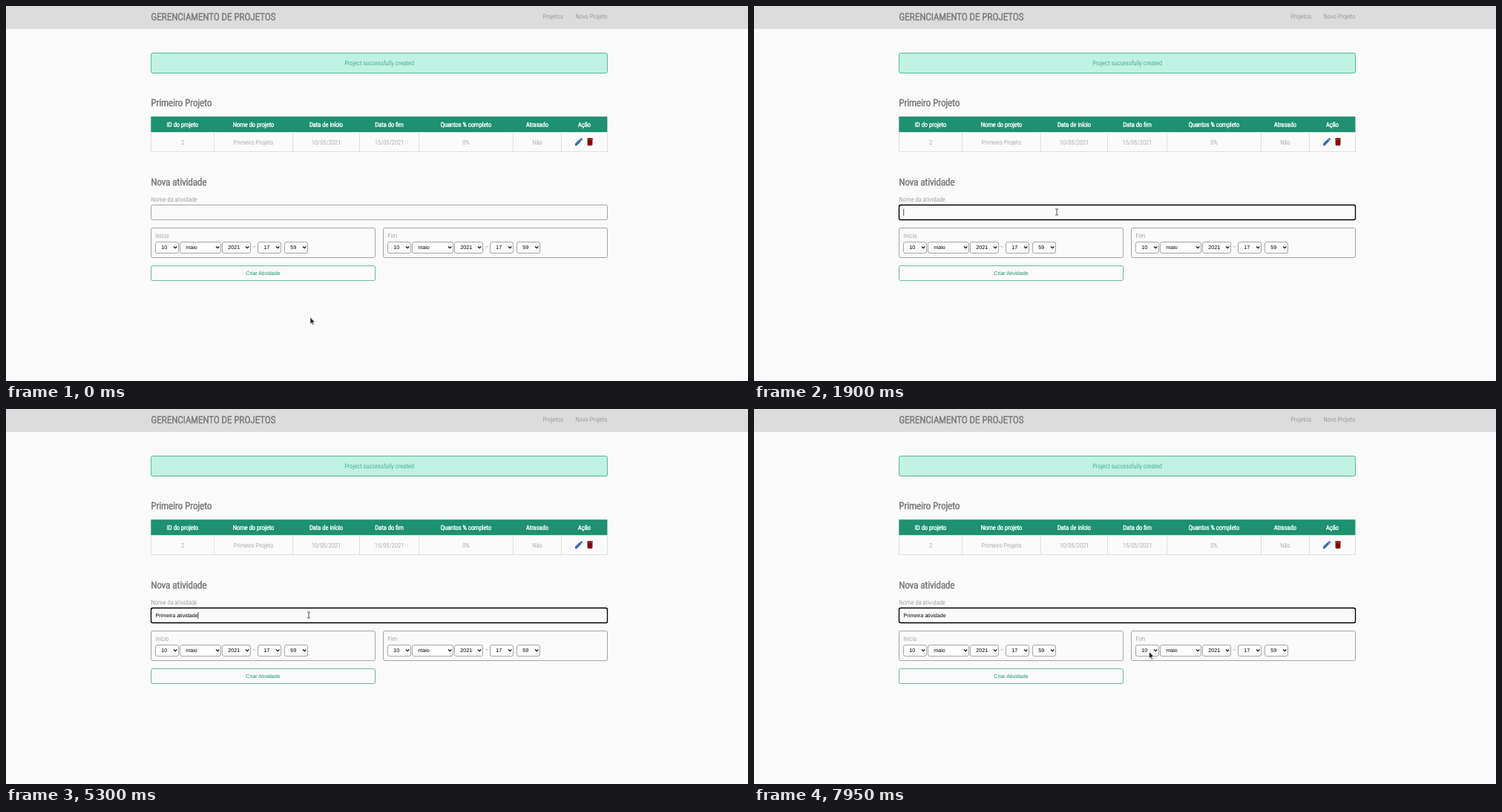
Recreate the animation shown at these times as an HTML page. Size 1000x506 px, loop 8 s.

```html
<!DOCTYPE html>
<html lang="pt">
<head>
<meta charset="utf-8">
<title>Gerenciamento de Projetos</title>
<style>
html, body { margin: 0; height: 100%; overflow: hidden; background: #fafafa; }
svg { display: block; width: 100vw; height: 100vh; }
text { font: 300 8.6px "Roboto Condensed", Roboto, sans-serif; font-stretch: 75%;
  fill: #7d7d7d; white-space: pre; text-rendering: geometricPrecision; }
.head { font-size: 12.9px; letter-spacing: .08px; stroke: #7d7d7d; stroke-width: .75px; }
.th { fill: #fff; stroke: #fff; stroke-width: .48px; }
.td { fill: #8c8c8c; }
.ui { font: 7.17px "Liberation Sans", Arial, sans-serif; fill: #000; }
.green { fill: #1d9170; }
.icon { filter: drop-shadow(.8px 1.6px 1.2px rgba(0,0,0,.5)); }
</style>
</head>
<body>
<svg id="stage" viewBox="0 0 1000 506" preserveAspectRatio="none"></svg>
<script>
const stage = document.getElementById('stage');
const GREEN = '#1d9170', GRAY = '#767676', THIN = .65;

function add(tag, attrs) {
  const el = document.createElementNS('http://www.w3.org/2000/svg', tag);
  for (const key in attrs) el.setAttribute(key, attrs[key]);
  return stage.appendChild(el);
}

// Narrow the face only where no condensed cut is installed
let squeeze = 1;
function label(str, x, y, cls = '', anchor = 'start') {
  const k = cls.includes('ui') ? 1 : squeeze;
  const el = add('text', { class: cls, 'text-anchor': anchor, transform: `translate(${x} ${y}) scale(${k} 1)` });
  el.textContent = str;
  return el;
}
function box(x1, y1, x2, y2, stroke, fill = 'none', rx = 2.2) {
  return add('rect', { x: x1, y: y1, width: x2 - x1, height: y2 - y1, rx, fill, stroke, 'stroke-width': THIN });
}
function line(d, stroke, width = 1) {
  return add('path', { d, fill: 'none', stroke, 'stroke-width': width });
}

const TITLE = 'GERENCIAMENTO DE PROJETOS';
const probe = label(TITLE, 0, -50, 'head');
if (probe.getComputedTextLength() > 14 * 12.9) squeeze = .875;
probe.remove();

// Header and notice
box(0, 0, 1000, 31, 'none', '#dcdcdc', 0);
label(TITLE, 195.5, 19.2, 'head');
label('Projetos', 751, 17.1, '', 'end');
label('Novo Projeto', 810.5, 17.1, '', 'end');
box(195.5, 63.5, 810.5, 90.5, GREEN, '#bff2e2');
label('Project successfully created', 503, 80.2, 'green', 'middle');

// Project table
label('Primeiro Projeto', 195.5, 135.2, 'head');
box(195.3, 149.2, 810.4, 170.2, 'none', GREEN, 0);
[['ID do projeto', '2', 238, 280.5], ['Nome do projeto', 'Primeiro Projeto', 333.5, 386.5],
 ['Data de início', '10/05/2021', 431.5, 476.5], ['Data do fim', '15/05/2021', 516.5, 556.5],
 ['Quantos % completo', '0%', 620, 683.5], ['Atrasado', 'Não', 716, 748.5], ['Ação', '', 779.5, 810.5]
].forEach(([head, value, mid, right]) => {
  label(head, mid, 162.7, 'th', 'middle');
  label(value, mid, 186.5, 'td', 'middle');
  line(`M${right} 170.5V197`, '#dfdfdf');
});
line('M195.5 170.5V196.5H811', '#dfdfdf');

function icon(d, x, y, fill) {
  add('path', { d, fill, class: 'icon', transform: `translate(${x} ${y}) scale(.55) translate(-12 -12)` });
}
icon('M3 17.2V21h3.8L17.8 9.9l-3.7-3.7zM20.7 7a1 1 0 0 0 0-1.4l-2.3-2.3a1 1 0 0 0-1.4 0l-1.8 1.8 3.7 3.7z', 772, 183, '#3068c6');
icon('M6 19a2 2 0 0 0 2 2h8a2 2 0 0 0 2-2V7H6zM19 4h-3.5l-1-1h-5l-1 1H5v2h14z', 787, 183, '#8b0000');

// Activity form
label('Nova atividade', 195.5, 241.6, 'head');
label('Nome da atividade', 195.5, 263.6);
const field = box(195.5, 268.5, 810.5, 288.5, GRAY);
const typed = label('', 201.5, 280.9, 'ui');
const caret = line('M0 274V283', '#000', .7);

function dateGroup(name, dx) {
  box(195.5 + dx, 299.5, 497.5 + dx, 339.5, GRAY);
  label(name, 201.5 + dx, 313.2);
  [['10', 201.5, 232.5], ['maio', 234.5, 289.5], ['2021', 291.5, 329.5], ['17', 339.5, 370.5], ['59', 375.5, 406.5]]
    .forEach(([value, left, right]) => {
      box(left + dx, 318.5, right + dx, 333.5, GRAY, '#fdfdfd', 2.5);
      label(value, left + 7.8 + dx, 328.4, 'ui');
      line(`M${right - 6.5 + dx} 324.5l2.2 2.2 2.2-2.2`, '#111', 1.2);
    });
  label('—', 331.6 + dx, 328.2);
  label(':', 372.2 + dx, 328.6);
}
dateGroup('Início', 0);
dateGroup('Fim', 313);
box(195.5, 350.5, 497.5, 370.5, GREEN);
label('Criar Atividade', 346.5, 362.8, 'ui green', 'middle');

// Pointers
const arrow = add('path', { d: 'M0 0V9.2L2.1 7.3 3.6 10.6 5 10 3.6 6.8H6.4Z', fill: '#222', stroke: '#fff', 'stroke-width': .6 });
const beam = line('M-2-4H-.6L0-3.5.6-4H2M-2 4H-.6L0 3.5.6 4H2M0-3.5V3.5', '#222', .8);

const LOOP = 8000, FOCUS = 1650, BLINK = 500;
const TEXT = 'Primeira atividade';
const KEYS = [2050, 2250, 2450, 2800, 2950, 3100, 3200, 3350, 3550, 4000, 4200, 4400, 4500, 4600, 4750, 4950, 5100, 5300];
// time, x, y
const PATH = [[50, 410, 420], [700, 408, 278], [6650, 408, 278], [7130, 530, 414], [7400, 543, 358], [7750, 532.5, 327.5]];

function pointer(t) {
  const i = PATH.findIndex(p => p[0] > t);
  if (i < 1) return PATH[i ? PATH.length - 1 : 0].slice(1);
  const [t0, x0, y0] = PATH[i - 1], [t1, x1, y1] = PATH[i];
  const u = (t - t0) / (t1 - t0), e = u * u * (3 - 2 * u);
  return [x0 + (x1 - x0) * e, y0 + (y1 - y0) * e];
}
function show(el, on) { el.setAttribute('visibility', on ? 'visible' : 'hidden'); }

function draw(t) {
  const focused = t >= FOCUS;
  field.setAttribute('stroke', focused ? '#000' : GRAY);
  field.setAttribute('stroke-width', focused ? 1.35 : THIN);

  const count = KEYS.filter(k => k <= t).length;
  typed.textContent = TEXT.slice(0, count);
  const lastKey = count ? KEYS[count - 1] : FOCUS;
  const x = 201.7 + (count ? typed.getComputedTextLength() : 0);
  caret.setAttribute('transform', `translate(${x} 0)`);
  // The blink runs slightly ahead of the half second
  show(caret, focused && Math.floor((t - lastKey + 50) / BLINK) % 2 === 0);

  const [px, py] = pointer(t);
  const inField = py > 268 && py < 289;
  for (const el of [arrow, beam]) el.setAttribute('transform', `translate(${px} ${py})`);
  show(arrow, !inField);
  show(beam, inField);
}

function frame() {
  draw(performance.now() % LOOP);
  requestAnimationFrame(frame);
}
frame();
</script>
</body>
</html>
```
